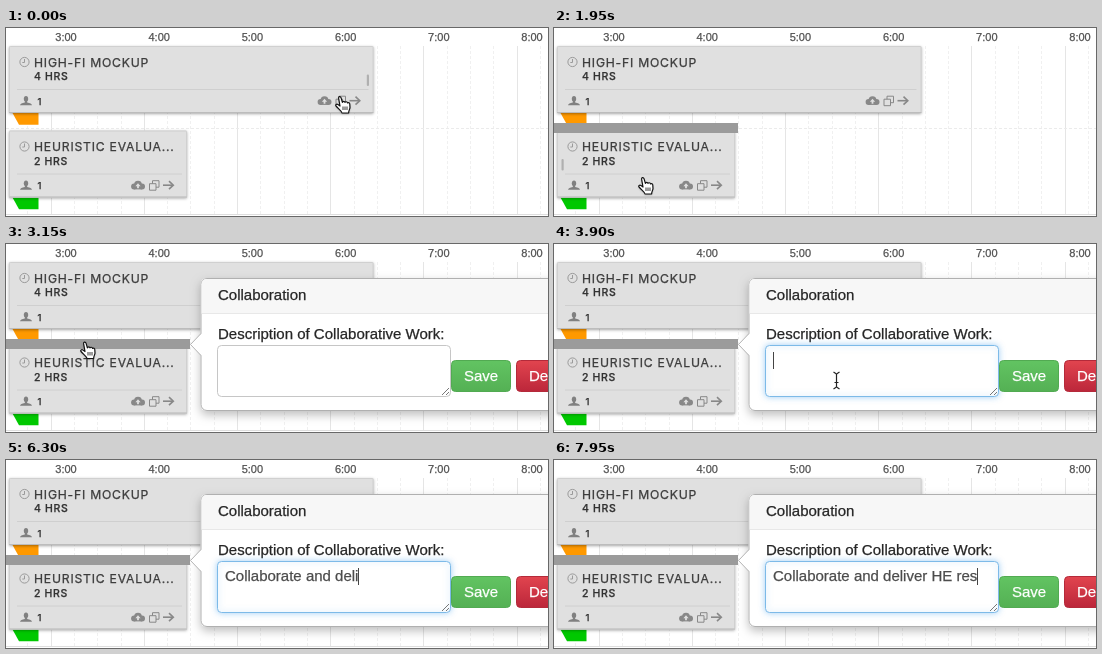
An HTML page with a canvas that plays this animation: 542 px wide and 188 px high, repeating every 8 s.

```html
<!DOCTYPE html>
<html lang="en">
<head>
<meta charset="utf-8">
<title>Collaboration</title>
<style>
  html, body { margin: 0; width: 100%; height: 100%; overflow: hidden; background: #fff; }
  canvas { display: block; width: 542px; height: 188px; }
</style>
</head>
<body>
<canvas id="stage"></canvas>
<script>
const W = 542, H = 188, LOOP = 8000, STEP = 150;
const canvas = document.getElementById('stage');
const c = canvas.getContext('2d');
const dpr = window.devicePixelRatio || 1;
canvas.width = W * dpr;
canvas.height = H * dpr;

const SANS = '"Liberation Sans", Arial, sans-serif';
const CAPS = 'Inter, "Open Sans", sans-serif';
const PHRASE = 'Collaborate and deliver HE res';

// time, x, y of the pointer's top left corner
const MOVES = [
  [450, 329, 68], [600, 321, 75], [750, 264, 111], [900, 194, 144],
  [1050, 149, 161], [1200, 117, 165], [1350, 99, 161], [1500, 99, 161],
  [1650, 84, 149], [2100, 84, 149], [2250, 79, 119], [2400, 74, 99],
  [2550, 74, 99], [2700, 74, 97.5], [3150, 74, 97.5], [3300, 94, 105],
  [3450, 155, 115], [3600, 220, 126], [3750, 265, 129], [3900, 279, 128]
];
// time, letters typed
const TYPED = [[4200, 0], [4950, 7], [6300, 20], [7950, 30]];

const HAND = new Path2D('M5 10L3.6 2.2C3.3.2 5.5 0 6 1.6L7.4 6.3C7.6 5 9.6 4.9 10 6.4' +
  'C10.4 5.4 12.2 5.5 12.6 7C13.4 6.2 14.8 6.8 14.8 8.2L15 11.5C15 13 13.8 14 13.6 17' +
  'L7 17C6.6 14.8 3.6 13 1 10C0 8.6 1.8 7.6 3 8.6Z');
const ARROW = new Path2D('M1 0V14L4.3 11L6.5 16L8.7 15L6.6 10.2H11Z');

function track(keys, t) {
  if (t <= keys[0][0]) return keys[0].slice(1);
  for (let i = 1; i < keys.length; i++) {
    const a = keys[i - 1], b = keys[i];
    if (t <= b[0]) {
      const k = (t - a[0]) / (b[0] - a[0]);
      return a.slice(1).map((v, j) => v + (b[j + 1] - v) * k);
    }
  }
  return keys[keys.length - 1].slice(1);
}

// a hairline stroke gives the slightly heavy look of smoothed screen type
function text(str, x, y, size, color, family = SANS, spacing = 0, weight = 400) {
  c.font = `${weight} ${size}px ${family}`;
  c.letterSpacing = spacing + 'px';
  c.fillStyle = c.strokeStyle = color;
  c.lineWidth = 0.25;
  c.fillText(str, x, y);
  c.strokeText(str, x, y);
}

function line(x1, y1, x2, y2, color, dash = [], width = 1) {
  c.beginPath();
  c.setLineDash(dash);
  c.moveTo(x1, y1);
  c.lineTo(x2, y2);
  c.strokeStyle = color;
  c.lineWidth = width;
  c.stroke();
  c.setLineDash([]);
}

function poly(points, fill) {
  c.beginPath();
  points.forEach(([x, y]) => c.lineTo(x, y));
  c.closePath();
  c.fillStyle = fill;
  c.fill();
}

function box(x, y, w, h, r, fill, stroke) {
  c.beginPath();
  c.roundRect(x, y, w, h, r);
  if (fill) { c.fillStyle = fill; c.fill(); }
  if (stroke) { c.strokeStyle = stroke; c.lineWidth = 1; c.stroke(); }
}

function shadow(color, blur, dy = 0) {
  c.shadowColor = color;
  c.shadowBlur = blur * dpr;
  c.shadowOffsetY = dy * dpr;
}
const noShadow = () => shadow('transparent', 0);

function grid() {
  for (let i = -1; i < 22; i++) {
    const x = Math.round(45.6 + i * 23.3) - 0.5;
    if (i % 4 === 0) line(x, 18, x, 186, '#e5e5e5');
    else line(x, 18, x, 186, '#f0f0f0', [3, 2]);
  }
  line(0, 100.5, W, 100.5, '#ebebeb', [3, 2]);
  line(0, 186.5, W, 186.5, '#dedede');
  for (let i = 0; i < 6; i++) text(`${i + 3}:00`, 49.3 + i * 93.2, 12.8, 11, '#505050');
}

function person(x, y) {
  c.fillStyle = '#808080';
  c.beginPath();
  c.ellipse(x, y - 2.2, 2.2, 2.9, 0, 0, 7);
  c.fill();
  c.beginPath();
  c.moveTo(x - 6, y + 4.2);
  c.quadraticCurveTo(x - 5.5, y + 2.2, x - 1.2, y + 1.5);
  c.lineTo(x - 1, y - 1);
  c.lineTo(x + 1, y - 1);
  c.lineTo(x + 1.2, y + 1.5);
  c.quadraticCurveTo(x + 5.5, y + 2.2, x + 6, y + 4.2);
  c.fill();
}

function clock(x, y) {
  c.strokeStyle = '#9a9a9a';
  c.lineWidth = 1;
  c.beginPath();
  c.arc(x, y, 4.6, 0, 7);
  c.moveTo(x, y - 3);
  c.lineTo(x, y + 0.5);
  c.lineTo(x - 2.2, y + 0.5);
  c.stroke();
}

function tools(right, y) {
  const ink = '#888', x = right - 49;
  c.fillStyle = ink;
  [[-4, 1.3, 2.9], [0, -0.6, 3.9], [4, 1.2, 3]].forEach(([dx, dy, r]) => {
    c.beginPath();
    c.arc(x + dx, y + dy, r, 0, 7);
    c.fill();
  });
  c.fillRect(x - 4, y, 8, 4.2);
  poly([[x, y - 2], [x + 2.6, y + 1], [x + 0.9, y + 1], [x + 0.9, y + 3],
    [x - 0.9, y + 3], [x - 0.9, y + 1], [x - 2.6, y + 1]], '#e0e0e0');

  box(right - 34.5, y - 4.5, 6.5, 6.5, 0, null, ink);
  box(right - 37.5, y - 1.5, 6.5, 6.5, 0, '#e0e0e0', ink);

  line(right - 24, y, right - 14, y, ink, [], 1.6);
  c.beginPath();
  c.moveTo(right - 18, y - 4);
  c.lineTo(right - 13.7, y);
  c.lineTo(right - 18, y + 4);
  c.stroke();
}

function card(y, width, title, hours, color) {
  const x = 3, right = x + width;
  poly([[6.5, y + 67], [32.5, y + 67], [32.5, y + 78.8], [13, y + 78.8]], color);
  shadow('rgba(0,0,0,.35)', 3, 1);
  box(x, y, width, 67, 1, '#e0e0e0');
  noShadow();
  box(x + 0.5, y + 0.5, width - 1, 66, 1, null, '#d0d0d0');
  line(x, y + 66.5, right, y + 66.5, '#bcbcbc');
  line(11, y + 43.5, right - 5, y + 43.5, '#cfcfcf');
  clock(18.5, y + 16);
  text(title, 28, y + 20.6, 12.2, '#3c3c3c', CAPS, 0.78);
  text(hours, 28, y + 34.3, 10.5, '#333', CAPS, 0.65, 500);
  person(20, y + 55);
  text('1', 31.6, y + 58.7, 9.5, '#333', CAPS, 0, 500);
  tools(right, y + 54.7);
}

function button(x, w, label, top, bottom, edge) {
  const g = c.createLinearGradient(0, 116, 0, 148);
  g.addColorStop(0, top);
  g.addColorStop(1, bottom);
  box(x + 0.5, 116.5, w - 1, 31, 4, g, edge);
  text(label, x + 13, 137, 15, '#fff');
}

function popover(focused, typed) {
  shadow('rgba(0,0,0,.25)', 10, 4);
  box(194.5, 34, 400, 133, 6, '#fff');
  noShadow();
  box(195, 34.5, 400, 132, 6, null, '#b0b0b0');
  box(195.5, 35, 399, 34, [5, 0, 0, 0], '#f7f7f7');
  line(195.5, 69.5, W, 69.5, '#e8e8e8');

  poly([[196, 89], [184.5, 100.5], [196, 112]], '#fff');
  line(195, 89.5, 184.5, 100.5, '#b4b4b4');
  line(184.5, 100.5, 195, 111.5, '#b4b4b4');

  text('Collaboration', 212, 56, 15, '#262626');
  text('Description of Collaborative Work:', 212, 95, 15, '#262626');

  if (focused) shadow('rgba(82,168,236,.5)', 6);
  box(211.5, 101.5, 233, 51, 4, '#fff', focused ? '#7dbae8' : '#c6c6c6');
  noShadow();
  line(436, 151, 443, 144, '#777');
  line(440, 151, 443, 148, '#777');

  if (focused) {
    const str = PHRASE.slice(0, typed);
    text(str, 219, 121.3, 15, '#4c4c4c');
    const x = Math.round(219 + c.measureText(str).width) + 0.5;
    line(x, 108, x, 125, '#444');
  }
  button(445, 60, 'Save', '#62c462', '#54b054', '#52aa52');
  button(510, 76, 'Delete', '#e2454f', '#bb263a', '#b42a3a');
}

function glyph(path, x, y) {
  c.save();
  c.translate(x, y);
  c.lineJoin = 'round';
  shadow('rgba(0,0,0,.3)', 2, 1);
  c.fillStyle = '#fff';
  c.fill(path);
  noShadow();
  c.strokeStyle = '#111';
  c.lineWidth = 1.2;
  c.stroke(path);
  if (path === HAND) for (const fx of [8, 10, 12]) line(fx, 10.5, fx, 14, '#222', [], 0.9);
  c.restore();
}

function beam(x, y) {
  line(x, y + 2, x, y + 15, '#222', [], 1.2);
  for (const [edge, mid] of [[0, 2], [17, 15]]) {
    line(x - 3, y + edge, x, y + mid, '#222', [], 1.2);
    line(x + 3, y + edge, x, y + mid, '#222', [], 1.2);
  }
  line(x - 2, y + 10.5, x + 2, y + 10.5, '#222');
}

function pointer(t) {
  const [x, y] = track(MOVES, t);
  if (t >= 3750) beam(x + 3.5, y);
  else glyph(t === 3600 ? ARROW : HAND, x, y);
}

function draw(time) {
  const t = Math.floor(time / STEP) * STEP;
  c.setTransform(dpr, 0, 0, dpr, 0, 0);
  c.fillStyle = '#fff';
  c.fillRect(0, 0, W, H);
  grid();
  card(18, 364.5, 'HIGH-FI MOCKUP', '4 HRS', '#ff9900');
  card(102.5, 178, 'HEURISTIC EVALUA...', '2 HRS', '#00c800');

  if (t < 750) box(360.8, 46.5, 2.2, 11.5, 1, '#b0b0b0');
  if (t >= 900 && t < 2400) box(7.5, 131, 2.2, 11.5, 1, '#b0b0b0');
  if (t >= 1950) {
    c.fillStyle = '#9b9b9b';
    c.fillRect(0, 95, 184, 10);
  }
  if (t >= 3000) {
    c.globalAlpha = t < 3150 ? 0.6 : 1;
    popover(t >= 3900, Math.floor(track(TYPED, t)[0] + 0.01));
    c.globalAlpha = 1;
  }
  if (t < 4200) pointer(t);
}

function frame() {
  draw(performance.now() % LOOP);
  requestAnimationFrame(frame);
}
frame();
</script>
</body>
</html>
```
